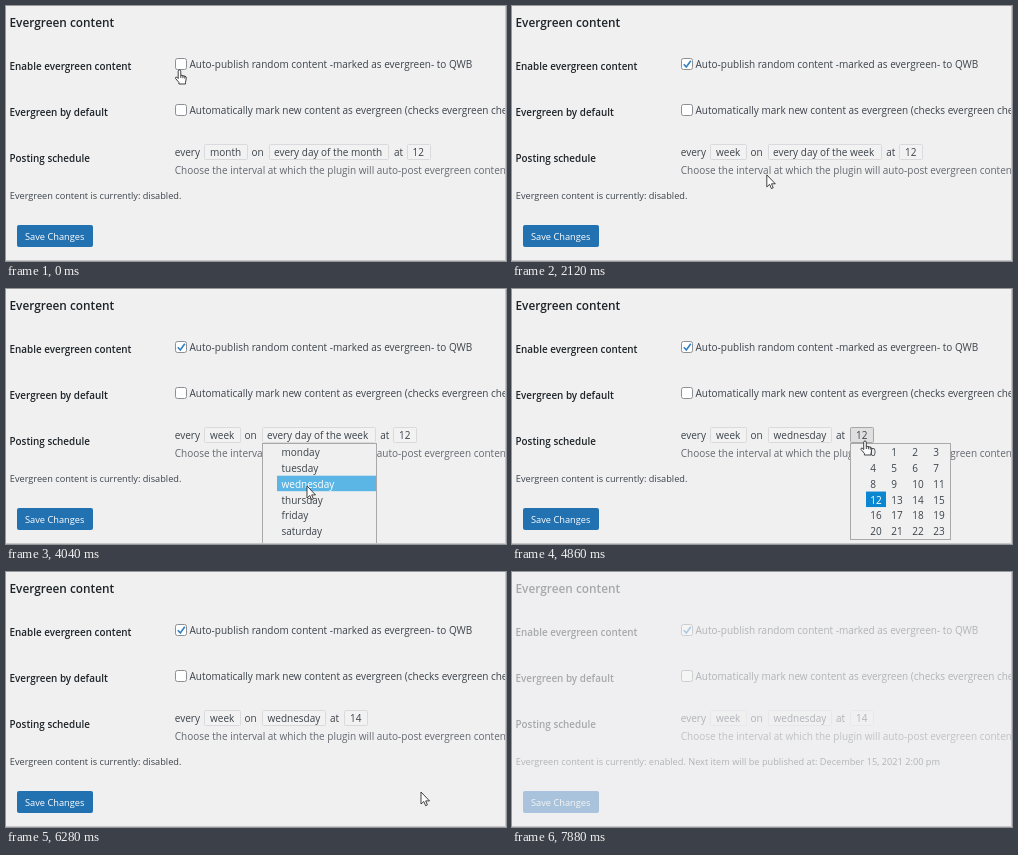
An HTML page for the animation above (8000 ms loop, 500 by 255 pixels).

```html
<!DOCTYPE html>
<html lang="en">
<head>
<meta charset="utf-8">
<title>Evergreen content settings</title>
<style>
  html, body { margin: 0; width: 100%; height: 100%; overflow: hidden; background: #f0f0f1; }
  svg { display: block; width: 500px; height: 255px; }
  text { font: 10px "Open Sans", "Noto Sans", sans-serif; fill: #3c434a; white-space: pre; }
  .head { font-size: 11.85px; font-weight: 600; fill: #1d2327; }
  .label { font-size: 9.9px; font-weight: 600; fill: #1d2327; }
  .hint { fill: #646970; }
  .status { font-size: 9.2px; }
  .save { font-size: 9.25px; fill: #fff; }
  .field { fill: #f2f2f2; stroke: #dadadc; }
  .field.over { fill: #dfdfdf; stroke: #a6a6a8; }
  .check { fill: #fff; stroke: #8c8f94; }
  .check.focus { stroke: #2271b1; }
  .menu { fill: #f0f0f0; stroke: #a9a9a9; }
  .option rect { fill: none; }
  .option.chosen rect { fill: #0a87d0; }
  .option.hover rect { fill: #5bb6e6; }
  .option.chosen text, .option.hover text { fill: #fff; }
  .cursor path { fill: #fff; stroke: #222; stroke-width: .85; stroke-linejoin: round; }
</style>
</head>
<body>
<svg id="stage" viewBox="0 0 500 255">
  <rect width="500" height="255" fill="#f0f0f1"/>
  <text class="head" x="3.5" y="20.5">Evergreen content</text>
  <text class="label" x="3.5" y="63.5">Enable evergreen content</text>
  <text class="label" x="3.5" y="109.5">Evergreen by default</text>
  <text class="label" x="3.5" y="155.5">Posting schedule</text>
  <rect id="check" class="check" x="169.5" y="52.5" width="11" height="11" rx="2"/>
  <path id="tick" d="M171.8 58.2L174.3 61L178.8 54.8" fill="none" stroke="#3582c4" stroke-width="1.7"/>
  <rect class="check" x="169.5" y="98.5" width="11" height="11" rx="2"/>
  <text x="183.5" y="62">Auto-publish random content -marked as evergreen- to QWB</text>
  <text x="183.5" y="108">Automatically mark new content as evergreen (checks evergreen checkbox)</text>
  <text class="hint" x="168.8" y="167.5">Choose the interval at which the plugin will auto-post evergreen content</text>
  <text x="168.8" y="150">every</text>
  <g id="rows"></g>
  <text id="status" class="status" x="3.8" y="193"></text>
  <rect id="ring" x="9.5" y="217.5" width="79" height="25" rx="3" fill="none" stroke="#2271b1"/>
  <rect id="button" x="11" y="219" width="76" height="22" rx="2"/>
  <text class="save" x="19" y="233.5">Save Changes</text>
  <g id="menus"></g>
  <g id="cursor" class="cursor">
    <path id="arrow" d="M0 0V12L2.8 9.5L4.6 13.7L6.4 12.9L4.7 8.9H8.5Z"/>
    <path id="hand" d="M-1.3 8.6V1.2Q-1.3 0 0 0Q1.3 0 1.3 1.2V5.2L5.6 6.2Q7 6.6 6.8 8.2L6 12.2V14H-.6V12.4L-4 8.4Q-4.2 6.8 -2.8 7ZM1.3 5.2V8M3.4 5.8V8.2M5.3 6.2V8.6"/>
  </g>
  <rect id="veil" width="500" height="255" fill="#f0f0f1"/>
  <path d="M499.5 0V254.5H0" fill="none" stroke="#c6c6c8"/>
</svg>
<script>
const LOOP = 8000;
const $ = id => document.getElementById(id);

function add(parent, tag, attrs, text) {
  const el = document.createElementNS("http://www.w3.org/2000/svg", tag);
  for (const key in attrs) el.setAttribute(key, attrs[key]);
  if (text) el.textContent = text;
  parent.append(el);
  return el;
}

const show = (el, on) => { el.style.display = on ? "" : "none"; };
const inside = (p, x, y, w, h) => p.x >= x && p.x < x + w && p.y >= y && p.y < y + h;

// Schedule line: words and boxed fields; a field is [x, width, text x, text].
function makeRow(from, to, words, fields) {
  const g = add($("rows"), "g");
  for (const [x, word] of words) add(g, "text", { x, y: 150 }, word);
  const boxes = fields.map(([x, width, tx, value]) => {
    const el = add(g, "rect", { class: "field", x: x + .5, y: 138.5, width, height: 15, rx: 1 });
    add(g, "text", { x: tx, y: 150 }, value);
    return { el, x, width };
  });
  return { g, from, to, boxes };
}

const week = [198, 36, 204, "week"];
const toWednesday = [[238.5, "on"], [324, "at"]];
const wednesday = [256, 63, 261.5, "wednesday"];
const rows = [
  makeRow(0, 1820, [[245.5, "on"], [388, "at"]],
    [[198, 43, 204, "month"], [263, 119, 268, "every day of the month"], [401, 23, 406.5, "12"]]),
  makeRow(1820, 4240, [[238.5, "on"], [374.3, "at"]],
    [week, [256, 113, 261, "every day of the week"], [387, 23, 393, "12"]]),
  makeRow(4240, 5960, toWednesday, [week, wednesday, [338, 23, 344, "12"]]),
  makeRow(5960, LOOP, toWednesday, [week, wednesday, [338, 23, 344, "14"]])
];

// Drop-down list laid out in equal cells.
function makeMenu(from, to, frame, cell, pad, columns, items, chosen) {
  const g = add($("menus"), "g");
  const [x, y, width, height] = frame;
  const pitch = 15.85;
  add(g, "rect", { class: "menu", x: x + .5, y: y + .5, width, height });
  const options = items.map((item, i) => {
    const cx = cell.x + (i % columns) * cell.pitch;
    const cy = 155 + Math.floor(i / columns) * pitch;
    const el = add(g, "g");
    add(el, "rect", { x: cx, y: cy, width: cell.width, height: 15.5 });
    add(el, "text", { x: cx + pad, y: cy + 12 }, item);
    return { el, x: cx, y: cy, width: cell.width, height: pitch, chosen: item === chosen };
  });
  return { g, from, to, options };
}

const hours = Array.from({ length: 24 }, (_, i) => String(i));
const menus = [
  makeMenu(1020, 1820, [198, 154, 56, 64], { x: 213.5, width: 40, pitch: 0 }, 4.5, 1,
    ["day", "week", "month", "year"], "month"),
  makeMenu(2640, 4240, [256, 154, 114, 120], { x: 271, width: 99, pitch: 0 }, 4.5, 1,
    ["monday", "tuesday", "wednesday", "thursday", "friday", "saturday", "sunday"]),
  makeMenu(4820, 5960, [338, 154, 100, 96], { x: 354, width: 20, pitch: 21 }, 4.2, 4, hours, "12")
];

// Pointer path: time, x, y.
const path = [
  [200, 173.5, 64], [860, 224, 142], [1020, 226, 146], [1180, 226, 146],
  [1680, 228, 180], [1860, 228, 180], [2540, 310, 146], [2640, 310, 146],
  [2940, 311, 174], [3400, 305, 205], [3560, 305, 205], [3840, 301, 197],
  [4240, 301, 197], [4720, 353, 152], [4900, 353, 152], [5660, 404, 203],
  [5760, 405, 204], [6000, 405, 204], [6240, 415, 220], [6300, 415, 220],
  [6680, 121, 212], [6980, 62, 226], [7260, 62, 226], [7580, 142, 214]
];

function pointer(t) {
  const next = path.findIndex(p => p[0] > t);
  const [t1, x1, y1] = path[next < 0 ? path.length - 1 : next];
  if (next < 1) return { x: x1, y: y1 };
  const [t0, x0, y0] = path[next - 1];
  const k = (t - t0) / (t1 - t0);
  const e = k * k * (3 - 2 * k);
  return { x: x0 + (x1 - x0) * e, y: y0 + (y1 - y0) * e };
}

function draw(t) {
  const p = pointer(t);
  const late = pointer(t - 100);
  const between = (a, b) => t >= a && t < b;
  const reloaded = t >= 7780;
  let hand = inside(p, 168, 51, 332, 15);

  for (const row of rows) {
    const on = between(row.from, row.to);
    show(row.g, on);
    for (const { el, x, width } of row.boxes) {
      const over = on && inside(p, x, 138, width, 16);
      el.classList.toggle("over", over);
      hand = hand || over;
    }
  }
  for (const menu of menus) {
    show(menu.g, between(menu.from, menu.to));
    for (const o of menu.options) {
      const hover = inside(late, o.x, o.y, o.width, o.height);
      o.el.setAttribute("class", "option" + (o.chosen ? " chosen" : "") + (hover ? " hover" : ""));
    }
  }

  show($("tick"), t >= 200);
  $("check").classList.toggle("focus", between(200, 1020));

  const overSave = !reloaded && inside(p, 11, 219, 76, 22);
  $("button").setAttribute("fill", overSave ? "#135e96" : "#2271b1");
  show($("ring"), between(7180, 7780));
  $("status").textContent = "Evergreen content is currently: " + (reloaded
    ? "enabled. Next item will be published at: December 15, 2021 2:00 pm" : "disabled.");

  hand = hand || overSave;
  show($("cursor"), !reloaded);
  show($("hand"), hand);
  show($("arrow"), !hand);
  $("cursor").setAttribute("transform", `translate(${p.x.toFixed(2)} ${p.y.toFixed(2)})`);
  $("veil").setAttribute("opacity", t >= 7880 ? .65 : reloaded ? .33 : 0);
}

let start;
function tick(now) {
  if (start === undefined) start = now;
  draw((now - start) % LOOP);
  requestAnimationFrame(tick);
}
draw(0);
requestAnimationFrame(tick);
</script>
</body>
</html>
```
